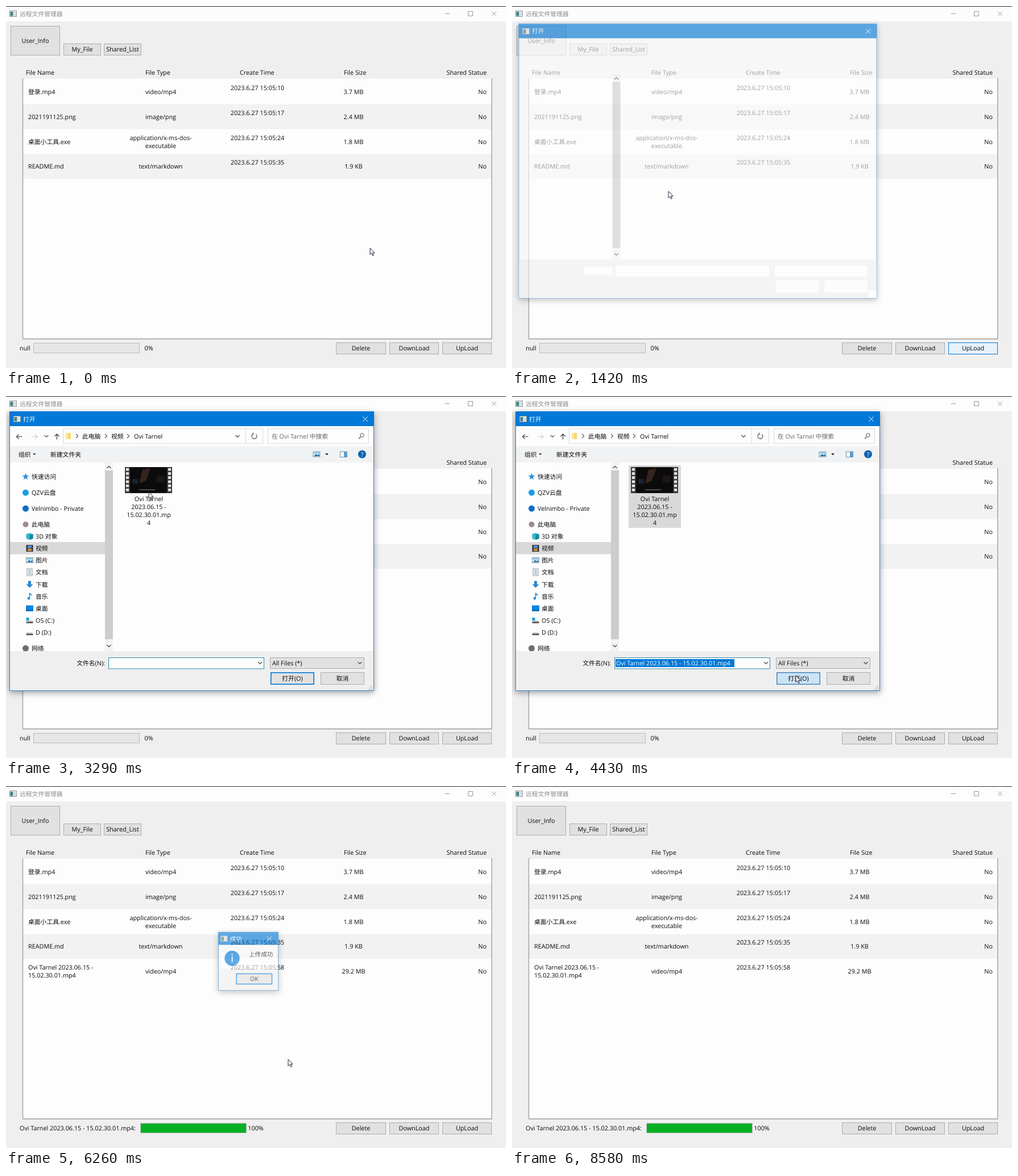
An HTML page that plays this animation: 879x637 px, repeating every 8.66 s.

```html
<!DOCTYPE html>
<html lang="zh">
<head>
<meta charset="utf-8">
<title>远程文件管理器</title>
<style>
html, body { margin: 0; width: 100%; height: 100%; overflow: hidden; background: #efefef; }
svg { display: block; width: 879px; height: 637px; }
text {
  font: 10.8px "Open Sans", "Noto Sans CJK SC", "Noto Sans CJK JP", "Noto Sans CJK", sans-serif;
  fill: #0a0a0a; white-space: pre; text-rendering: geometricPrecision;
}
.m { text-anchor: middle; }
.e { text-anchor: end; }
.w { fill: #fff; }
.g { fill: #666; }
.win { filter: drop-shadow(0 3px 6px rgba(0, 0, 0, .38)); }
#dialog { transform-origin: 326.5px 273px; }
#message { transform-origin: 426px 308.5px; }
#title text { fill: #8c8c8c; }
#title .ctl { stroke: #999; }
#title.on .bar { fill: #0078d7; }
#title.on text { fill: #fff; }
#title.on .ctl { stroke: #fff; }
.hover rect { fill: #e5f1fb; stroke: #0078d7; }
.press rect { fill: #cce4f7; stroke: #005499; stroke-width: 1; }
</style>
</head>
<body>
<svg id="stage" viewBox="0 0 879 637">
  <defs>
    <linearGradient id="shine">
      <stop offset="0" stop-color="#7be384" stop-opacity="0"/>
      <stop offset=".5" stop-color="#7be384"/>
      <stop offset="1" stop-color="#7be384" stop-opacity="0"/>
    </linearGradient>
    <clipPath id="fillClip"><rect id="fillBox" x="1" y="594" width="0" height="16"/></clipPath>
    <clipPath id="sideClip"><rect x="7" y="117" width="167" height="332"/></clipPath>
  </defs>
</svg>
<script>
const LOOP = 8660, BLUE = '#0078d7';
const CLIP = 'Ovi Tarnel', FILE = CLIP + ' 2023.06.15 - 15.02.30.01.mp4';
const $ = id => document.getElementById(id);

// Markup helpers
const text = (x, y, s, cls = '', id = '') => `<text x="${x}" y="${y}" class="${cls}"${id && ` id="${id}"`}>${s}</text>`;
const rect = (x, y, w, h, fill, stroke = 'none', sw = 1, extra = '') =>
  `<rect x="${x}" y="${y}" width="${w}" height="${h}" fill="${fill}" stroke="${stroke}" stroke-width="${sw}" ${extra}/>`;
const line = (d, stroke = '#555', sw = 1, cls = '') =>
  `<path d="${d}" fill="none" stroke="${stroke}" stroke-width="${sw}" class="${cls}"/>`;
const shape = (d, fill, stroke = 'none') => `<path d="${d}" fill="${fill}" stroke="${stroke}"/>`;
const dot = (x, y, r, fill) => `<circle cx="${x}" cy="${y}" r="${r}" fill="${fill}"/>`;
const group = (id, body, attrs = '') => `<g id="${id}" ${attrs}>${body}</g>`;
const chevron = (x, y, color = '#555') => line(`M${x - 2} ${y - 3.5}l3.5 3.5l-3.5 3.5`, color, 1.1);
const down = (x, y, s = 1, color = '#444') => line(`M${x - 3.5} ${y - 2 * s}l3.5 ${3.5 * s}l3.5 ${-3.5 * s}`, color, 1.2);
const appIcon = (x, y) => rect(x + .5, y + .5, 12, 10, '#f4f4f4', '#8a969a') +
  rect(x + 1.5, y + 2, 5, 7.5, '#3f8580') + rect(x + 8, y + 2, 3.5, 7.5, '#d3dade');
const cross = (x, y, r, color, cls) => line(`M${x - r} ${y - r}l${2 * r} ${2 * r}M${x + r} ${y - r}l${-2 * r} ${2 * r}`, color, 1, cls);

// The border lies inside the outer box x, y, w + 1, h + 1
function button(id, x, y, w, h, label, main) {
  const inset = main ? .8 : .5, sw = main ? 1.6 : 1;
  return group(id, rect(x + inset, y + inset, w + 1 - 2 * inset, h + 1 - 2 * inset, '#e1e1e1', main ? BLUE : '#adadad', sw) +
    text(x + w / 2 + .5, y + h / 2 + 4.2, label, 'm'));
}

function titleBar() {
  return group('title', rect(0, 0, 879, 27, '#fdfdfd', 'none', 1, 'class="bar"') + rect(0, 0, 879, 1, '#2b2b2b') +
    appIcon(6, 8) + text(24, 17.5, '远程文件管理器') +
    line('M771.5 13.5h8.5M812.5 9.5h8v8h-8z', '', 1, 'ctl') + cross(858, 13.5, 4, '', 'ctl'));
}

function row(i, name, type, date, size) {
  const y = 155 + 43.8 * i;
  const cell = (x, s, cls) => s.length > 1
    ? text(x, y - 7, s[0], cls) + text(x, y + 7, s[1], cls) : text(x, y, s[0], cls);
  return cell(39, name, '') + cell(272, type, 'm') + text(442, y - 7, '2023.6.27 15:05:' + date, 'm') +
    text(611, y, size, 'm') + text(845, y, 'No', 'e');
}

function mainWindow() {
  return rect(0, 0, 879, 637, '#efefef') + titleBar() +
    button('user', 8, 35, 86, 51, 'User_Info') +
    button('mine', 101, 66, 65, 20, 'My_File') +
    button('shared', 172, 66, 65, 20, 'Shared_List') +
    text(35, 121, 'File Name') + text(245, 121, 'File Type') + text(411, 121, 'Create Time') +
    text(594, 121, 'File Size') + text(845, 121, 'Shared Statue', 'e') +
    rect(29, 128, 825, 458, '#fdfdfd') + rect(30, 173, 823, 44, '#f2f2f2') + rect(30, 261, 823, 43, '#f2f2f2') +
    line('M29.5 127V586M853.8 127V586', '#a0a0a0', 1.4) + line('M29 585.7H854.5', '#a0a0a0', 1.4) +
    row(0, ['登录.mp4'], ['video/mp4'], '10', '3.7 MB') +
    row(1, ['2021191125.png'], ['image/png'], '17', '2.4 MB') +
    row(2, ['桌面小工具.exe'], ['application/x-ms-dos-', 'executable'], '24', '1.8 MB') +
    row(3, ['README.md'], ['text/markdown'], '35', '1.9 KB') +
    group('newRow', row(4, [CLIP + ' 2023.06.15 -', '15.02.30.01.mp4'], ['video/mp4'], '58', '29.2 MB')) +
    text(24, 606, 'null', '', 'label') +
    group('meter', rect(.5, 593.5, 186, 17, '#e6e6e6', '#bcbcbc') +
      `<g clip-path="url(#fillClip)">${rect(0, 594, 187, 17, '#06b025')}` +
      rect(0, 594, 110, 17, 'url(#shine)', 'none', 1, 'id="glow"') + '</g>' + text(203, 606, '0%', 'm', 'percent')) +
    button('del', 580, 592, 87, 20, 'Delete') + button('get', 674, 592, 86, 20, 'DownLoad') +
    button('put', 767, 592, 86, 20, 'UpLoad');
}

// Small icons, drawn around their centre
const icons = {
  star: shape('M0-6l1.6 4.2 4.4.2-3.5 2.8 1.3 4.4L0 3.2l-3.8 2.4 1.3-4.4L-6-1.6l4.4-.2z', '#2f8fd8'),
  cloudA: dot(0, 0, 5.5, '#1e9be8'),
  cloudB: dot(0, 0, 5.5, '#0f6cc4'),
  pc: dot(0, 0, 5, '#a08a90'),
  cube: shape('M-6-4l6-2 6 2v8l-6 2-6-2z', '#31b8cf') + shape('M0-2l6-2v8l-6 2z', '#17839c'),
  film: rect(-6, -6, 12, 12, '#2c3440') + rect(-3.5, -5, 7, 4.5, '#5b8fd0') + rect(-3.5, .5, 7, 4.5, '#c9903f'),
  photo: rect(-6, -4.5, 12, 9, '#e8f2f8', '#8a9aa5') + shape('M-5 3.5l4-4 3 2 3-2v4z', '#2c76b0') + rect(-5, -4, 10, 3, '#8cc8ee'),
  doc: rect(-4.5, -6, 9, 12, '#f7f7f7', '#8a9aa0') + line('M-2.5-3h5M-2.5 0h5M-2.5 3h5', '#4b86a8'),
  load: shape('M-2.5-6h5V0H6L0 6-6 0h3.5z', '#2b86d0'),
  note: line('M0 3V-6q1 3 4 4', '#1f8fe0', 1.6) + dot(-1.5, 3.6, 2.4, '#1f8fe0'),
  desk: rect(-6.5, -5, 13, 10, '#0a84dc') + rect(-6.5, 3, 13, 2, '#0865ae'),
  disk: shape('M-6 2l2-2h8l2 2v3h-12z', '#666') + shape('M-6 2l2-2h8l2 2z', '#ccc'),
  net: dot(0, 0, 5.5, '#6d6d6d'),
  folder: rect(-4.5, -5.5, 9, 11, '#f7d774') + rect(-4.5, -5.5, 4, 11, '#ffe79c')
};
icons.system = rect(-6, -5, 5, 5, '#12a0e0') + icons.disk;
const icon = (name, x, y) => `<g transform="translate(${x} ${y})">${icons[name]}</g>`;

const places = [
  ['快速访问', 141.5, 0, 'star'], ['QZV云盘', 170, 0, 'cloudA'], ['Velnimbo - Private', 198, 0, 'cloudB'],
  ['此电脑', 226, 0, 'pc'], ['3D 对象', 247, 1, 'cube'], ['视频', 268, 1, 'film'], ['图片', 289, 1, 'photo'],
  ['文档', 310, 1, 'doc'], ['下载', 331.5, 1, 'load'], ['音乐', 352.5, 1, 'note'], ['桌面', 373.5, 1, 'desk'],
  ['OS (C:)', 395, 1, 'system'], ['D (D:)', 416, 1, 'disk'], ['网络', 444, 0, 'net']
];

function sidebar() {
  const names = places.map(([s, y, lvl, ic]) => icon(ic, 34.5 + 7 * lvl, y) + text(45 + 7 * lvl, y + 4, s)).join('');
  const marks = places.map(([s, y, lvl]) => s === '此电脑' ? down(16, y) : chevron(16 + 7 * lvl, y, '#777')).join('');
  return `<g clip-path="url(#sideClip)">${rect(6.5, 257.5, 167, 20.5, '', '', 1, 'id="place"')}${names}${group('marks', marks)}</g>`;
}

// Open folder: back, contents, then the front flap up to the given edge
function folder(cx, edge, inner) {
  return `<g transform="translate(${cx - 251} 0)">` + shape('M223 134h20l4 3h25v42l5 4v19l-5 3h-45z', '#f6d77f') + inner +
    shape(`M223 133L${edge} 143v63L223 199z`, '#ffe59a') + shape('M223 133l14 6v64l-14-4z', '#fadc85') + '</g>';
}
const arrow = (x, y, k) => `<g transform="translate(${x} ${y}) scale(${k})">` +
  shape('M-8.5-18h17V0H16L0 18-16 0h7.5z', '#3f7f9f') + '</g>';
const page = (x, y, w, h, c) => shape(`M${x} ${y}h${w - c}l${c} ${c}v${h - c}h${-w}z`, '#f5f5f5', '#d8d8d8') +
  shape(`M${x + w - c} ${y}l${c} ${c}h${-c}z`, '#d6d6d6');

function address(names, ic, search, more) {
  const xs = [134, 185, 225];
  return icon(ic, 109.5, 70.5) + chevron(125, 70.5) +
    names.map((s, i) => text(xs[i], 74.5, s) + (i < 2 && (more || !i || names[2]) ? chevron([176, 215][i], 70.5) : '')).join('') +
    text(467, 74.5, `在 ${search} 中搜索`, 'g');
}

function desktopView() {
  const sheets = rect(250, 146, 20, 54, '#f4f4ee', '#ddd') +
    line('M257 150h10M257 155h10M257 160h10M257 165h10M257 170h10M257 175h10M257 180h10M257 185h10', '#6aa0c0', 2.2);
  const note = page(240, 141, 36, 61, 9) + arrow(256.5, 169, .5) + rect(260, 186, 9, 9, '#1f80c6');
  return address(['此电脑', '桌面'], 'desk', '桌面', true) +
    folder(251, 253, sheets) + text(251, 220, 'My_CGI', 'm') + folder(361, 243, note) + text(361, 220, '开发日志', 'm') +
    page(440.5, 126.5, 61, 81, 18) + arrow(472, 167, 1) + rect(481, 188, 16, 16, '#1f80c6') + text(471.5, 220, 'README.md', 'm');
}

function videoView() {
  return address(['此电脑', '视频'], 'film', '视频', true) + rect(205, 122, 92, 104, '#e5f3ff', 'none', 1, 'id="spot"') +
    folder(251, 248, rect(246, 144, 24, 54, '#2b2622')) + text(251, 220, CLIP, 'm');
}

function clipView() {
  let holes = '';
  for (let y = 127; y < 170; y += 7.2) holes += rect(211, y, 5, 4.5, '#e8e8e8') + rect(285, y, 5, 4.5, '#e8e8e8');
  return address(['此电脑', '视频', CLIP], 'folder', CLIP) +
    rect(205, 122, 92, 110, '#d9d9d9', 'none', 1, 'id="pick"') + rect(209, 125, 83, 46, '#3c3c3c') + holes +
    rect(218, 125.5, 65, 45, '#0c0b0c') + shape('M240 130l14-3-8 22-12 5z', '#33261f') + rect(222, 146, 10, 8, '#1b2430') +
    rect(234, 164, 28, 2, '#4e4a48') + rect(265, 140, 14, 12, '#1d1613') +
    [CLIP, '2023.06.15 -', '15.02.30.01.mp', '4'].map((s, i) => text(251, 184.5 + 14 * i, s, 'm')).join('');
}

function dialog() {
  const blanks = [[124, 462, 50, 15], [180, 460, 274, 20], [464, 460, 166, 20], [466, 486, 77, 22], [553, 486, 77, 22], [632, 504, 14, 14]]
    .map(b => rect(...b, '#fdfdfd')).join('');
  const nav = group('back', line('M28.5 71.5h-10m4-4l-4 4l4 4', 'currentColor', 1.2) + down(71, 71, .7, 'currentColor')) +
    line('M45 71.5h10m-4-4l4 4l-4 4', '#ccc', 1.2) + line('M89.5 76.5v-9.5m-4 4l4-4l4 4', '#444', 1.3) +
    rect(100.5, 57.5, 321, 26, '#fdfdfd', '#d9d9d9') + rect(421.5, 57.5, 30, 26, '#fdfdfd', '#d9d9d9') +
    rect(460.5, 57.5, 177, 26, '#fdfdfd', '#d9d9d9') +
    down(407, 71) + line('M439.5 67.5a4.5 4.5 0 1 1-5-.8m-.3-2.3l.6 2.9-2.8.6', '#555', 1.2) +
    '<circle cx="626" cy="69" r="3.2" fill="none" stroke="#555"/>' + line('M623.5 71.5l-3.5 3.7', '#555', 1.3);
  const tools = rect(7, 88, 639, 29, '#f1f2f3') + text(22, 106.5, '组织') + shape('M47 101h5.5l-2.7 3z', '#333') +
    text(78, 106.5, '新建文件夹') + icon('photo', 546, 102.5) + shape('M561 101h6l-3 3.3z', '#222') +
    rect(587.5, 98, 12, 9.5, '#fff', '#6b90ab') + rect(594, 98, 5.5, 9.5, '#5a9fd0') +
    dot(626, 102.5, 7, '#0a63b0') + text(626, 106.5, '?', 'm w');
  const grip = [[642, 510], [639, 513], [642, 513], [636, 516], [639, 516], [642, 516]].map(p => rect(...p, 1.6, 1.6, '#aaa')).join('');
  const form = text(174, 474, '文件名(N):', 'e') + rect(180.5, 460.5, 273, 19.5, '#fdfdfd', '#2f86b0') + down(446.5, 470) +
    group('fileName', rect(182, 463, 209, 14, BLUE) + text(183, 474, FILE, 'w')) +
    rect(464.5, 460.5, 165, 19, '#e1e1e1', '#adadad') + text(468, 474, 'All Files (*)') + down(622, 470) +
    button('open', 465, 486, 76, 21, '打开(O)', true) + button('cancel', 553, 486, 76, 21, '取消') + grip;
  return group('dialog', rect(6.5, 27.5, 640, 491, '#fdfdfd', '#2f86cf') + rect(6, 27, 641, 26, BLUE) + appIcon(13, 35) +
    text(30, 44.5, '打开', 'w') + cross(631.5, 40.5, 4.2, '#fff') + rect(7, 449, 639, 69, '#efefef') +
    rect(174, 117, 14, 332, '#f2f2f2') + rect(174, 131, 14, 297, '#cdcdcd') + down(181, 125, -1) + down(181, 440) +
    group('blank', blanks) +
    group('ui', nav + tools + sidebar() + group('view0', desktopView()) + group('view1', videoView()) + group('view2', clipView()) + form), 'class="win"');
}

function message() {
  return group('message', rect(372.5, 256.5, 107, 104, '#fdfdfd', '#2f86cf') + rect(372, 256, 108, 23, BLUE) + appIcon(376, 262.5) +
    text(393, 272, '成功', 'w') + cross(464, 268, 4, '#fff') + rect(373, 322, 106, 38, '#efefef') +
    dot(397, 303, 13.5, BLUE) + rect(396.2, 299.5, 1.8, 10, '#fff') + dot(397.1, 296, 1.2, '#fff') +
    text(427, 299.5, '上传成功') + button('ok', 404, 330, 64, 19, 'OK', true), 'class="win"');
}

$('stage').insertAdjacentHTML('beforeend', mainWindow() + dialog() + message() +
  group('cursor', shape('M0 0v11.6l2.7-2.5 2 4.3 1.8-.8-2-4.1h3.6z', '#fff', '#23233a')));

// Pointer stops: time, x, y
const path = [
  [0, 640, 426], [40, 640, 426], [320, 514, 232], [780, 802, 598], [890, 808, 605], [1100, 808, 605],
  [1420, 275, 326], [1470, 275, 326], [1910, 170, 300], [2440, 80, 275], [2640, 80, 275], [2960, 250, 165],
  [3560, 252, 172], [4180, 496, 488], [4400, 499, 492], [4640, 499, 492], [5260, 499, 493], [5560, 499, 493],
  [6220, 496, 481], [6310, 496, 481], [6780, 437, 341], [7320, 440, 345], [8050, 480, 640], [LOOP, 480, 640]
];
const during = (t, a, b) => t >= a && t < b;
const show = (id, on) => { $(id).style.display = on ? '' : 'none'; };

function along(t, stops) {
  let i = 1;
  while (i < stops.length - 1 && t >= stops[i][0]) i++;
  const a = stops[i - 1], b = stops[i], u = (t - a[0]) / (b[0] - a[0]), k = u * u * (3 - 2 * u);
  return [1, 2].map(n => a[n] + (b[n] - a[n]) * k);
}

// Window fades advance in whole 40 ms steps
function fade(id, t, start, end) {
  const at = from => Math.floor((t - from) / 40);
  const alpha = t < end ? [.3, .62, .87][at(start)] ?? 1 : [.62, .3][at(end)] ?? 0;
  show(id, t >= start && alpha > 0);
  $(id).style.opacity = alpha;
  $(id).style.transform = `scale(${1 - .045 * (1 - alpha)})`;
}

function progress(t) {
  if (t < 5290) return Math.max(0, (t - 4720) / 570 * 65);
  return Math.min(100, 65 + (t - 5290) / 510 * 35);
}

function draw(t) {
  const [x, y] = along(t, path);
  $('cursor').setAttribute('transform', `translate(${x} ${y})`);
  $('title').setAttribute('class', during(t, 1060, 1380) || during(t, 4640, 6220) || during(t, 6940, 8580) ? 'on' : '');
  $('put').setAttribute('class', during(t, 1060, 1140) ? 'press' : during(t, 780, 2000) ? 'hover' : '');

  fade('dialog', t, 1380, 4560);
  show('blank', t < 1500);
  show('ui', t >= 1500);
  const view = t < 2640 ? 0 : t < 3160 ? 1 : 2;
  for (let i = 0; i < 3; i++) show('view' + i, i === view);
  $('back').style.color = view ? '#444' : '#ccc';
  show('marks', during(t, 2200, 2760));
  show('place', t >= 2440);
  $('place').style.fill = t < 2760 ? '#cce8ff' : '#d9d9d9';
  $('place').style.stroke = t < 2760 ? '#99d1ff' : '#d9d9d9';
  show('spot', t >= 2900);
  show('pick', t >= 3450);
  $('pick').style.fill = t < 4400 ? '#cce8ff' : '#d9d9d9';
  show('fileName', t >= 3450);
  $('open').setAttribute('class', t >= 4400 ? 'press' : t >= 4140 ? 'hover' : '');

  const sending = t >= 4720, p = progress(Math.floor((t - 10) / 40) * 40 + 10);
  $('label').textContent = sending ? FILE + ':' : 'null';
  $('meter').setAttribute('transform', `translate(${sending ? 236 : 48} 0)`);
  $('percent').textContent = Math.floor(p + .01) + '%';
  $('fillBox').setAttribute('width', 1.85 * p);
  $('glow').setAttribute('x', ((t - 5290) * .35 + 101 + 600) % 300 - 110);
  show('glow', p < 100);
  show('newRow', t >= 6180);

  fade('message', t, 6220, 6900);
  $('ok').setAttribute('class', during(t, 6840, 7000) ? 'press' : during(t, 6700, 6840) ? 'hover' : '');
}

let start;
function tick(now) {
  start ??= now;
  draw((now - start) % LOOP);
  requestAnimationFrame(tick);
}
draw(0);
requestAnimationFrame(tick);
</script>
</body>
</html>
```
